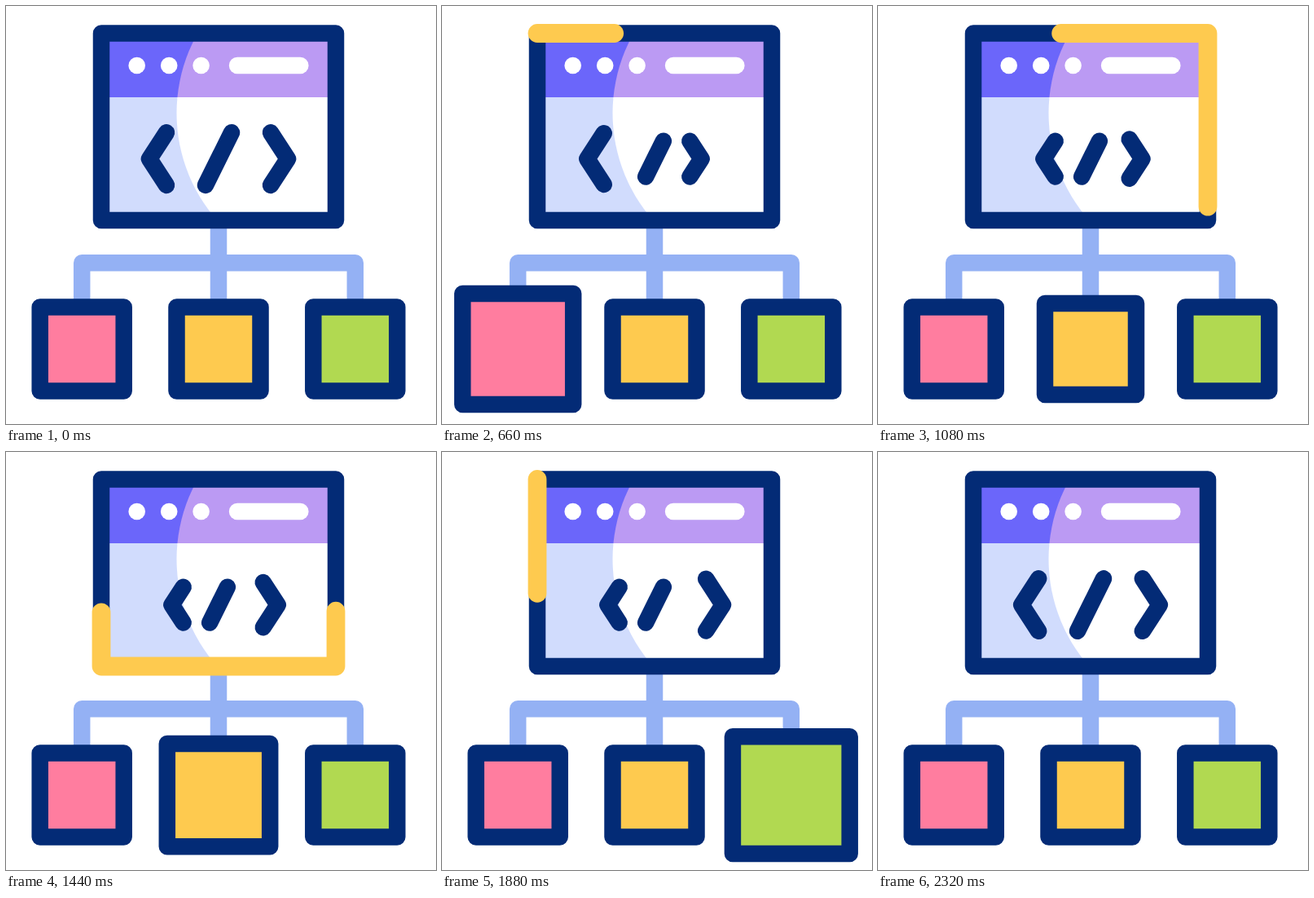
An HTML page for the animation above (2400 ms loop, 528 by 513 pixels).

```html
<!DOCTYPE html>
<html lang="en">
<head>
<meta charset="utf-8">
<title>Code network</title>
<style>
  html, body { margin: 0; width: 100%; height: 100%; overflow: hidden; background: #fff; }
  svg { display: block; width: 100vw; height: 100vh; }
  .line { fill: none; stroke-linecap: round; stroke-linejoin: round; stroke-width: 20.5; }
  .navy { stroke: #032b76; }
  .link { stroke: #94b1f4; stroke-linecap: butt; }
  .trail { stroke: #feca4f; stroke-width: 22.8; }
</style>
</head>
<body>
<svg viewBox="0 0 528 513">
  <defs>
    <clipPath id="screen"><rect x="117" y="33.5" width="288" height="229.5"/></clipPath>
    <clipPath id="bright"><circle cx="408.5" cy="131.5" r="199"/></clipPath>
  </defs>

  <path class="line link" d="M93.2 370V315.3H428.8V370M261 263V370"/>

  <g clip-path="url(#screen)">
    <rect x="117" y="33" width="288" height="79" fill="#6b66fa"/>
    <rect x="117" y="112" width="288" height="152" fill="#d1dcfd"/>
    <g clip-path="url(#bright)">
      <rect x="117" y="33" width="288" height="79" fill="#bb9af3"/>
      <rect x="117" y="112" width="288" height="152" fill="#fff"/>
    </g>
  </g>
  <g fill="#fff">
    <circle cx="160.7" cy="73" r="10.3"/>
    <circle cx="200.2" cy="73" r="10.3"/>
    <circle cx="239.6" cy="73" r="10.3"/>
    <rect x="273.8" y="62.7" width="97.8" height="20.5" rx="10.25"/>
  </g>
  <rect class="line navy" x="117" y="33.5" width="288" height="229.5"/>

  <path class="line navy" id="left"/>
  <path class="line navy" id="slash"/>
  <path class="line navy" id="right"/>
  <path class="line trail" id="trail"/>

  <rect class="line navy" id="pink" style="fill:#ff7d9f"/>
  <rect class="line navy" id="yellow" style="fill:#feca4f"/>
  <rect class="line navy" id="green" style="fill:#b1d951"/>
</svg>
<script>
const LOOP = 2400, SMALL = 0.677;
const $ = id => document.getElementById(id);

const ease = (t, from, to) => {
  const u = Math.min(1, Math.max(0, (t - from) / (to - from)));
  return u * u * (3 - 2 * u);
};
const pulse = (t, start, peak, end) => ease(t, start, peak) - ease(t, peak, end);

// Symbol points relative to the middle of the code mark
const symbols = {
  left: [[-64, -32.3], [-85, 0], [-64, 32.3]],
  slash: [[16, -32.3], [-16, 32.3]],
  right: [[64, -32.3], [85, 0], [64, 32.3]]
};

function drawSymbol(id, open) {
  const s = SMALL + (1 - SMALL) * open;
  const points = symbols[id].map(([x, y]) => `${261 + x * s} ${187.6 + y * s}`);
  $(id).setAttribute("d", "M" + points.join("L"));
}

function drawBox(id, cx, grow) {
  const half = 51.5 + grow, box = $(id);
  box.setAttribute("x", cx - half);
  box.setAttribute("y", 421.1 - half);
  box.setAttribute("width", half * 2);
  box.setAttribute("height", half * 2);
}

// Clockwise outline of the window, starting at its top left corner
const corners = [[117, 33.5], [405, 33.5], [405, 263], [117, 263], [117, 33.5]];
const stops = [0, 288, 517.5, 805.5, 1035];

function pointAt(d) {
  let i = 0;
  while (i < 3 && d > stops[i + 1]) i++;
  const u = (d - stops[i]) / (stops[i + 1] - stops[i]);
  const [a, b] = [corners[i], corners[i + 1]];
  return [a[0] + (b[0] - a[0]) * u, a[1] + (b[1] - a[1]) * u];
}

function drawTrail(tail, head) {
  const from = tail * 1035, to = head * 1035;
  const turns = corners.filter((c, i) => stops[i] > from && stops[i] < to);
  const points = [pointAt(from), ...turns, pointAt(to)];
  $("trail").setAttribute("d", to - from > 0.01 ? "M" + points.map(p => p.join(" ")).join("L") : "");
}

function draw(t) {
  const first = pulse(t, 390, 720, 980);
  const second = pulse(t, 980, 1320, 1580);
  const third = pulse(t, 1590, 1920, 2180);
  const rest = 1 - ease(t, 210, 390) + ease(t, 2160, 2330);

  drawSymbol("left", Math.max(rest, first));
  drawSymbol("slash", rest);
  drawSymbol("right", Math.max(rest, second, third));

  drawBox("pink", 93.2, 18 * first);
  drawBox("yellow", 261, 21.2 * second);
  drawBox("green", 428.8, 21.2 * third);

  drawTrail(ease(t, 800, 2205), ease(t, 402, 1790));
}

const begin = performance.now();
function tick() {
  draw((performance.now() - begin) % LOOP);
  requestAnimationFrame(tick);
}
draw(0);
requestAnimationFrame(tick);
</script>
</body>
</html>
```
